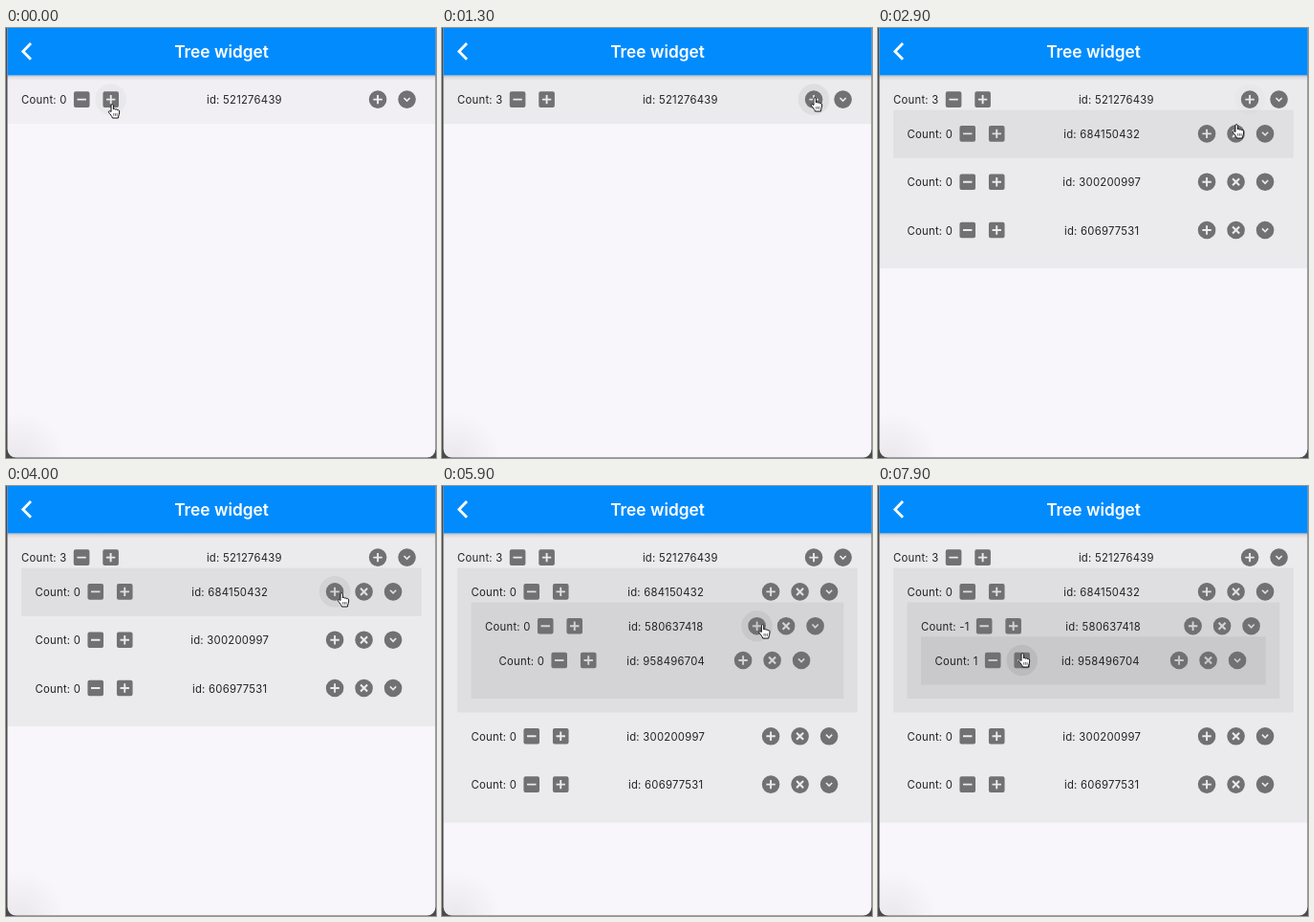
Recreate the animation shown at these times as an HTML page with a canvas. Size 450 by 449 pixels, loop 8000 ms.

```html
<!DOCTYPE html>
<html lang="en">
<head>
<meta charset="utf-8">
<title>Tree widget</title>
<style>
html, body { margin: 0; width: 100%; height: 100%; overflow: hidden; background: #4a4a4c; }
canvas { display: block; width: 450px; height: 449px; }
</style>
</head>
<body>
<canvas id="stage" width="450" height="449"></canvas>
<script>
const ctx = document.getElementById('stage').getContext('2d');
const LOOP = 8000;
const ICON = '#717072';
const PAD = 14.5, ROW = 36, STEP = 30.5;

// born: time of creation; hover: time the pointer enters
// counts: [time, value]; rings: [button, from, to]; taps: [button, time]
const node = (id, born, rest = {}) =>
  ({ id, born, hover: Infinity, counts: [], rings: [], taps: [], kids: [], ...rest });

const root = node(521276439, -1, {
  root: true,
  hover: -110,
  counts: [[200, 1], [400, 2], [600, 3]],
  rings: [['inc', -35, 720], ['add', 1000, 2750]],
  taps: [['inc', 200], ['inc', 400], ['inc', 600], ['add', 1500], ['add', 1900], ['add', 2600]],
  kids: [
    node(684150432, 1500, {
      hover: 2720,
      rings: [['add', 3300, 4560]],
      taps: [['add', 4150]],
      kids: [
        node(580637418, 4200, {
          hover: 4700,
          rings: [['add', 4950, 5950], ['dec', 6550, 7180]],
          taps: [['add', 5450], ['dec', 6750]],
          counts: [[6800, -1]],
          kids: [
            node(958496704, 5500, {
              hover: 7250,
              rings: [['inc', 7400, 9000]],
              taps: [['inc', 7700]],
              counts: [[7700, 1]]
            })
          ]
        })
      ]
    }),
    node(300200997, 1900),
    node(606977531, 2600)
  ]
});

// Pointer path: [time, x, y]
const path = [
  [0, 107, 79], [680, 107, 79], [1100, 386, 72], [2660, 386, 72],
  [2900, 371, 100], [3100, 368, 104], [3450, 347, 111], [4500, 347, 111],
  [5050, 334, 144], [5850, 334, 144], [6650, 106, 146], [7100, 106, 146],
  [7500, 147, 174], [8000, 147, 174]
];
const hand = new Path2D('M3 8.6V1.8C3 .2 5.4 .2 5.4 1.8V6C5.6 5 7.4 5 7.6 6.3' +
  'C8 5.5 9.5 5.7 9.7 6.9C10.3 6.3 11.7 6.7 11.7 8C11.7 11 10.8 12 10.4 15H4.4' +
  'C4 13 2.2 11.4 .6 9.2C-.2 7.8 1.4 6.8 3 8.6Z');

const clamp = v => Math.max(0, Math.min(1, v));
const ease = v => v * v * (3 - 2 * v);
const alive = (n, t) => n.kids.filter(k => t >= k.born);
const height = (n, t) =>
  alive(n, t).reduce((sum, k) => sum + height(k, t), ROW + PAD - 0.2);

function poly(points, angle = 0) {
  const p = new Path2D(), c = Math.cos(angle), s = Math.sin(angle);
  points.forEach(([x, y]) => p.lineTo(x * c - y * s, x * s + y * c));
  p.closePath();
  return p;
}

function cross(a, w) {
  return [[-a, -w], [-w, -w], [-w, -a], [w, -a], [w, -w], [a, -w],
    [a, w], [w, w], [w, a], [-w, a], [-w, w], [-a, w]];
}

// A solid button shape with its sign cut out
function icon(round, sign) {
  const p = new Path2D();
  if (round) p.arc(0, 0, 9.3, 0, 7);
  else p.roundRect(-8.3, -8.3, 16.6, 16.6, 2);
  p.closePath();
  p.addPath(sign);
  return p;
}

const plus = poly(cross(4.7, 0.95));
const icons = {
  dec: icon(false, poly([[-4.7, -0.95], [4.7, -0.95], [4.7, 0.95], [-4.7, 0.95]])),
  inc: icon(false, plus),
  add: icon(true, plus),
  del: icon(true, poly(cross(5, 1.05), Math.PI / 4)),
  open: icon(true, poly([[-3.7, -1.1], [-2.5, -2.2], [0, 0.4], [2.5, -2.2], [3.7, -1.1], [0, 2.7]]))
};

function disc(x, y, alpha) {
  if (alpha <= 0) return;
  ctx.fillStyle = `rgba(0,0,0,${alpha})`;
  ctx.beginPath();
  ctx.arc(x, y, 16.3, 0, 7);
  ctx.fill();
}

function drawRow(n, x, y, right, t) {
  const count = n.counts.reduce((v, [at, to]) => t >= at ? to : v, 0);
  const label = 'Count: ' + count;
  const cy = y + 24.8;
  ctx.font = '11.3px Inter, sans-serif';
  ctx.letterSpacing = '0.25px';
  const end = x + PAD + ctx.measureText(label).width;
  const spots = { dec: end + 15.6, inc: end + 15.6 + STEP };
  ['open', ...(n.root ? [] : ['del']), 'add'].forEach((name, i) => {
    spots[name] = right - 29.7 - STEP * i;
  });

  for (const [name, from, to] of n.rings) {
    disc(spots[name], cy, 0.055 * clamp((t - from) / 60) * clamp(1 - (t - to) / 200));
  }
  for (const [name, at] of n.taps) {
    if (t >= at) disc(spots[name], cy, 0.07 * clamp(1 - (t - at) / 260));
  }

  ctx.fillStyle = '#232324';
  ctx.textAlign = 'left';
  ctx.fillText(label, x + PAD, cy + 4.7);
  ctx.textAlign = 'center';
  ctx.fillText('id: ' + n.id, (spots.inc + spots.add) / 2, cy + 4.7);

  ctx.fillStyle = ICON;
  for (const name in spots) {
    ctx.save();
    ctx.translate(spots[name], cy);
    ctx.fill(icons[name], 'evenodd');
    ctx.restore();
  }
}

function drawNode(n, x, y, right, t) {
  const shade = 0.052 * clamp((t - n.hover) / 200);
  ctx.fillStyle = `rgba(0,0,0,${shade})`;
  ctx.fillRect(x, y, right - x, height(n, t));
  drawRow(n, x, y, right, t);
  let top = y + ROW - 0.2;
  for (const kid of alive(n, t)) {
    drawNode(kid, x + PAD, top, right - PAD, t);
    top += height(kid, t);
  }
}

function drawHeader() {
  const shadow = ctx.createLinearGradient(0, 49, 0, 55);
  shadow.addColorStop(0, 'rgba(0,0,0,0.24)');
  shadow.addColorStop(0.4, 'rgba(0,0,0,0.07)');
  shadow.addColorStop(1, 'rgba(0,0,0,0)');
  ctx.fillStyle = shadow;
  ctx.fillRect(0, 49, 450, 6);
  ctx.fillStyle = '#028bfd';
  ctx.fillRect(0, 0, 450, 49.3);

  ctx.strokeStyle = '#fff';
  ctx.lineWidth = 2.8;
  ctx.beginPath();
  ctx.moveTo(26, 16);
  ctx.lineTo(17.8, 24.4);
  ctx.lineTo(26, 32.8);
  ctx.stroke();

  ctx.fillStyle = '#fff';
  ctx.font = '600 17.3px Inter, sans-serif';
  ctx.letterSpacing = '0px';
  ctx.textAlign = 'center';
  ctx.fillText('Tree widget', 225.5, 30.6);
}

function drawPointer(t) {
  const i = path.findIndex(p => p[0] > t);
  const [t0, x0, y0] = path[i - 1], [t1, x1, y1] = path[i];
  const k = ease((t - t0) / (t1 - t0));
  ctx.save();
  ctx.translate(x0 + (x1 - x0) * k, y0 + (y1 - y0) * k);
  ctx.fillStyle = '#fff';
  ctx.strokeStyle = '#111';
  ctx.lineWidth = 1;
  ctx.lineJoin = 'round';
  ctx.fill(hand);
  ctx.stroke(hand);
  ctx.beginPath();
  for (const x of [5.7, 7.4, 9.1]) {
    ctx.moveTo(x, 10);
    ctx.lineTo(x, 12.8);
  }
  ctx.lineWidth = 0.6;
  ctx.stroke();
  ctx.restore();
}

function draw(t) {
  ctx.fillStyle = '#4a4a4c';
  ctx.fillRect(0, 0, 450, 449);
  ctx.save();
  ctx.beginPath();
  ctx.roundRect(1.5, -20, 448, 468.6, 9);
  ctx.clip();
  ctx.fillStyle = '#f8f6fa';
  ctx.fillRect(0, 0, 450, 449);
  const corner = ctx.createRadialGradient(14, 449, 0, 14, 449, 48);
  corner.addColorStop(0, 'rgba(0,0,0,0.06)');
  corner.addColorStop(1, 'rgba(0,0,0,0)');
  ctx.fillStyle = corner;
  ctx.fillRect(0, 395, 70, 54);
  drawNode(root, 1.5, 49.8, 449.3, t);
  drawHeader();
  ctx.restore();
  drawPointer(t);
}

const start = performance.now();
function tick() {
  draw((performance.now() - start) % LOOP);
  requestAnimationFrame(tick);
}
tick();
</script>
</body>
</html>
```
